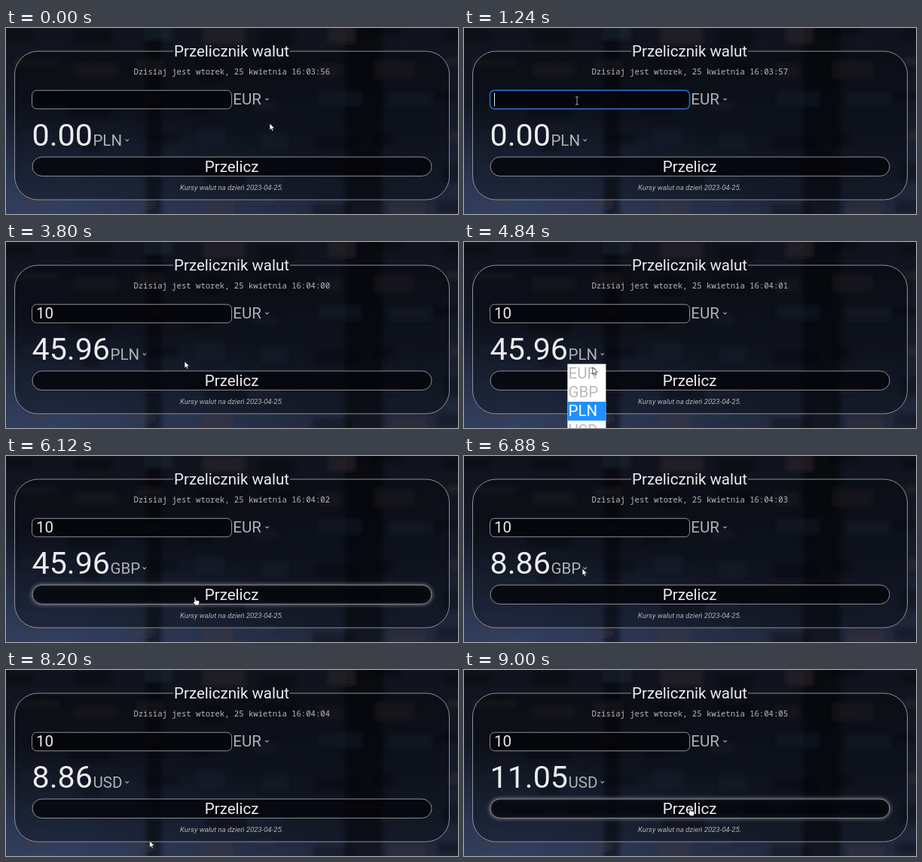
Write an HTML page that moves like this. It is 600x248 px and loops after 9.28 s.

```html
<!DOCTYPE html>
<html lang="pl">
<head>
<meta charset="utf-8">
<title>Przelicznik walut</title>
<style>
  html, body { margin: 0; width: 100%; height: 100%; overflow: hidden; background: #10131c; }
  svg { display: block; width: 100vw; height: 100vh; }
  text { font-family: Roboto, sans-serif; font-size: 20.5px; fill: #ececee; white-space: pre; }
  .mid { text-anchor: middle; }
  .soft text { fill: #b2b2b4; }
  #clock { font-family: "Noto Sans Mono", monospace; font-size: 10.6px; fill: #b8b8ba; }
  #note { font-size: 9.6px; font-style: italic; fill: #b4b4b6; }
  #amount { font-size: 41.2px; }
  #menu text { fill: #b9b9b9; }
  .line { fill: none; stroke: #8f9095; }
  .panel { fill: #04050a; fill-opacity: .8; stroke: #8f9095; }
  .chevron { fill: none; stroke: #b2b2b4; stroke-width: 1.1; }
</style>
</head>
<body>
<svg viewBox="0 0 600 248">
  <defs>
    <filter id="blur" x="-10%" y="-10%" width="120%" height="120%"><feGaussianBlur stdDeviation="3"/></filter>
    <filter id="halo" x="-5%" y="-60%" width="110%" height="220%"><feGaussianBlur stdDeviation="2"/></filter>
    <linearGradient id="night" x2="0" y2="1">
      <stop offset="0" stop-color="#10131c"/>
      <stop offset=".5" stop-color="#151a28"/>
      <stop offset="1" stop-color="#222a3f"/>
    </linearGradient>
    <radialGradient id="dusk" cx=".1" cy="1" r=".6">
      <stop offset="0" stop-color="#3a4a70" stop-opacity=".7"/>
      <stop offset="1" stop-color="#3a4a70" stop-opacity="0"/>
    </radialGradient>
    <path id="chevron" class="chevron" d="M43 -8.6l2.2 2.2 2.2-2.2"/>
    <rect id="pill" x="35" y="172" width="530" height="25.4" rx="12.7"/>
  </defs>

  <rect width="600" height="248" fill="url(#night)"/>
  <rect width="600" height="248" fill="url(#dusk)"/>
  <g id="photo" filter="url(#blur)"></g>

  <rect x="11.5" y="31" width="577" height="198" rx="31" fill="#020308" fill-opacity=".36"/>
  <path class="line" d="M377 31H557.5a31 31 0 0 1 31 31V198a31 31 0 0 1-31 31H42.5a31 31 0 0 1-31-31V62a31 31 0 0 1 31-31H222"/>
  <text class="mid" x="299.5" y="38">Przelicznik walut</text>
  <text class="mid" id="clock" x="299.7" y="62"></text>

  <rect id="field" class="panel" x="34.5" y="83.2" width="265" height="24.6" rx="6"/>
  <text id="typed" x="40" y="102.4"></text>
  <path id="caret" d="M0 86.5V104.5" stroke="#e8e8e8"/>
  <g class="soft" transform="translate(301.3 102.4)"><text>EUR</text><use href="#chevron"/></g>

  <text id="amount" x="34.5" y="157"></text>
  <g id="unit" class="soft"><text></text><use href="#chevron"/></g>

  <use id="glow" href="#pill" fill="none" stroke="#fff" stroke-width="3" filter="url(#halo)"/>
  <use href="#pill" class="panel"/>
  <text class="mid" x="299.6" y="192">Przelicz</text>
  <text class="mid" id="note" x="299.6" y="216">Kursy walut na dzień 2023-04-25.</text>

  <g id="menu"></g>

  <g id="pointer" stroke-linejoin="round" stroke-width=".7">
    <path id="arrow" d="M0 0V9.2L2.1 7.3 3.5 10.4 5 9.7 3.7 6.7H6.6Z" fill="#fff" stroke="#111"/>
    <path id="hand" d="M-.9 .8Q0-.6.9 .8V4.2L5 5.1Q6 5.5 5.8 6.8L5 11H.2L-2.6 7.2Q-2.9 5.8-.9 6.7Z" fill="#fff" stroke="#111"/>
    <path id="beam" d="M-2-5H2M0-5V5M-2 5H2" fill="none" stroke="#ddd"/>
  </g>
</svg>
<script>
const LOOP = 9280, STEP = 40, LAST = 9000;
const CLICK_DELAY = 120, MENU_TOP = 162.6, ROW = 25.2;
const EURO_RATES = { EUR: 1, GBP: .886, PLN: 4.596, USD: 1.105 };
const CODES = Object.keys(EURO_RATES);

const $ = id => document.getElementById(id);
const set = (node, name, value) => node.setAttribute(name, value);
const show = (node, on) => set(node, "visibility", on ? "visible" : "hidden");

function add(parent, tag, attrs, label = "") {
  const node = document.createElementNS("http://www.w3.org/2000/svg", tag);
  for (const name in attrs) set(node, name, attrs[name]);
  node.textContent = label;
  parent.append(node);
  return node;
}

// Blurred banknotes: dark gaps between stacks, then scattered brown and blue prints.
let seed = 7;
const random = () => (seed = seed * 16807 % 2147483647) / 2147483647;
for (const x of [186, 450])
  add($("photo"), "rect", { x, y: -10, width: x / 9, height: 270, fill: "#05060a", opacity: .45 });
for (let row = 0; row < 6; row++)
  for (let col = 0; col < 8; col++)
    add($("photo"), "rect", {
      x: col * 80 + random() * 30, y: row * 46 - 8 + random() * 14,
      width: 24 + random() * 36, height: 8 + random() * 18,
      fill: random() < .4 ? "#4a3b38" : random() < .5 ? "#2b3750" : "#06070c",
      opacity: .28
    });

add($("menu"), "rect", { x: -1.2, y: MENU_TOP, width: 51, height: 4 * ROW, fill: "#fff" });
const bar = add($("menu"), "rect", { x: -1.2, width: 51, height: ROW, fill: "#1e90ff" });
const items = CODES.map((code, i) => add($("menu"), "text", { y: 182 + i * ROW }, code));

// Each visit: what is clicked, where, and when the pointer departs and arrives.
const visits = [
  ["field", 150, 97, 0, 720],
  ["convert", 284, 184, 1960, 2910],
  ["rest", 237, 159, 3400, 3800],
  ["open", 172, 151, 3960, 4480],
  ["GBP", 168, 203, 4640, 5180],
  ["convert", 251, 188, 5620, 6120],
  ["open", 157, 150, 6400, 6880],
  ["USD", 152, 243, 7040, 7480],
  ["convert", 300, 183.5, 8000, 8600]
].map(([action, x, y, depart, arrive]) => ({ action, x, y, depart, arrive }));

function pointerAt(t) {
  let x = 350, y = 127;
  for (const v of visits) {
    const k = Math.min(1, Math.max(0, (t - v.depart) / (v.arrive - v.depart)));
    const ease = k * k * (3 - 2 * k);
    x += (v.x - x) * ease;
    y += (v.y - y) * ease;
  }
  return { x, y };
}

function stateAt(t) {
  const state = { focused: false, open: false, unit: "PLN", amount: 0 };
  for (const { action, arrive } of visits) {
    if (t < arrive + CLICK_DELAY) break;
    if (action === "rest") continue;
    state.focused = action === "field";
    state.open = action === "open";
    if (action in EURO_RATES) state.unit = action;
    if (action === "convert") state.amount = 10 * EURO_RATES[state.unit];
  }
  return state;
}

function overButton(t) {
  const { x, y } = pointerAt(t);
  return !stateAt(t).open && x > 35 && x < 565 && y > 172 && y < 197.4;
}

// Hover averaged over a short window gives the fade.
function glowAt(t) {
  let sum = 0;
  for (let i = 0; i < 8; i++) sum += overButton(t - i * 20);
  return sum / 8;
}

// The highlight trails the pointer slightly and starts on the current unit.
function markedRow(t, unit) {
  const row = Math.floor((pointerAt(t - 120).y - MENU_TOP) / ROW);
  return row < 0 ? CODES.indexOf(unit) : row;
}

function draw(t) {
  const { focused, open, unit, amount } = stateAt(t);
  const clock = new Date(2023, 3, 25, 16, 3, 56, 440 + t).toTimeString().slice(0, 8);
  $("clock").textContent = "Dzisiaj jest wtorek, 25 kwietnia " + clock;

  const typed = "10".slice(0, Math.max(0, Math.floor((t - 1280) / 240)));
  $("typed").textContent = typed;
  set($("field"), "style", focused ? "stroke: #2767b8; stroke-width: 1.7" : "");
  show($("caret"), focused && Math.floor((t - 760) / 500) % 2 === 0);
  set($("caret"), "transform", `translate(${40.5 + typed.length * 11.5} 0)`);

  const price = amount.toFixed(2);
  const unitX = 35.2 + ((price.length - 1) * .5615 + .263) * 41.2;
  $("amount").textContent = price;
  $("unit").firstElementChild.textContent = unit;
  set($("unit"), "transform", `translate(${unitX} 157)`);

  const marked = markedRow(t, unit);
  show($("menu"), open);
  set($("menu"), "transform", `translate(${unitX} 0)`);
  set(bar, "y", MENU_TOP + marked * ROW);
  items.forEach((item, i) => item.style.fill = i === marked ? "#fff" : "");

  set($("glow"), "opacity", glowAt(t) * .4);

  const { x, y } = pointerAt(t);
  const inField = x > 34 && x < 300 && y > 83 && y < 108;
  const shape = inField ? "beam" : overButton(t) ? "hand" : "arrow";
  for (const id of ["arrow", "hand", "beam"]) show($(id), id === shape);
  set($("pointer"), "transform", `translate(${x} ${y})`);
}

const start = performance.now();
function tick() {
  const t = (performance.now() - start) % LOOP;
  draw(Math.min(LAST, Math.floor(t / STEP) * STEP));
  requestAnimationFrame(tick);
}
tick();
</script>
</body>
</html>
```
